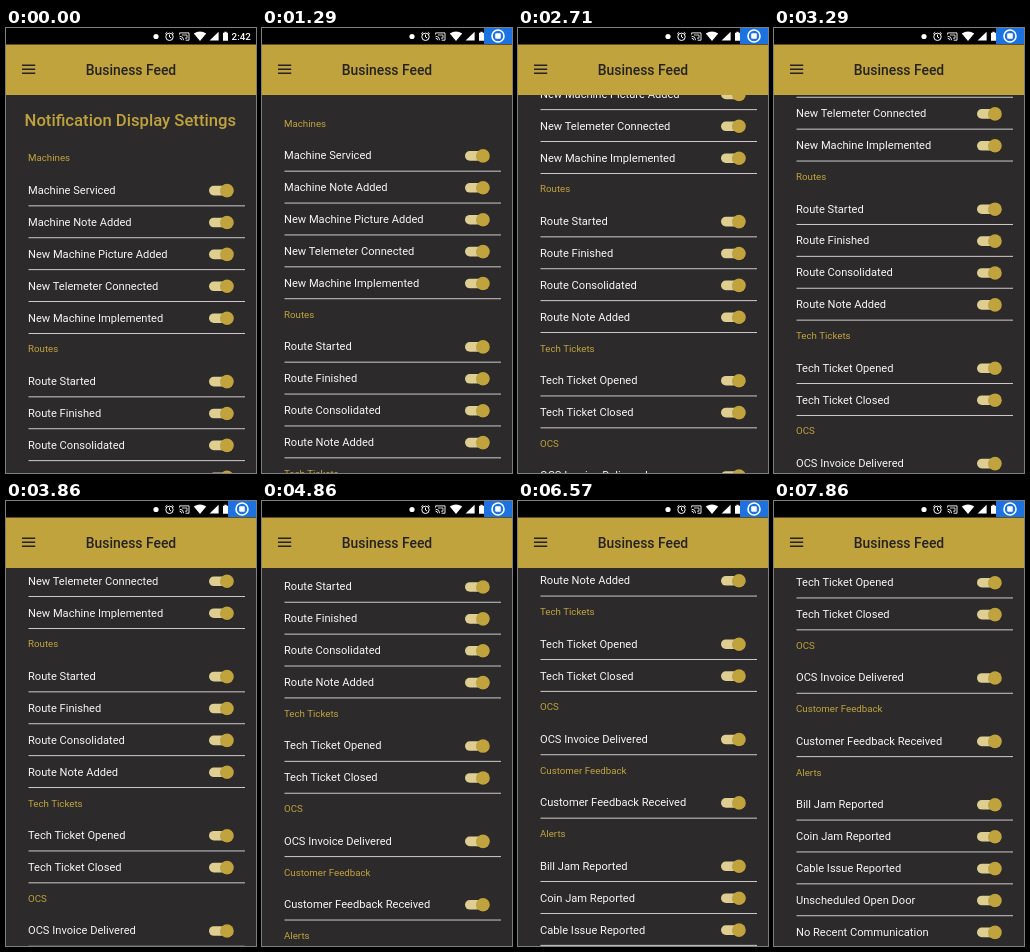
An HTML page for the animation above (8000 ms loop, 250x445 px).

```html
<!DOCTYPE html>
<html lang="en">
<head>
<meta charset="utf-8">
<title>Business Feed</title>
<style>
  html, body { margin: 0; width: 100%; height: 100%; overflow: hidden; background: #2c2a2b; }
  svg { display: block; width: 100%; height: 100%; font-family: Roboto, sans-serif; }
  .title { font-size: 16.67px; font-weight: 500; fill: #c1a33e; }
  .head { font-size: 9.72px; fill: #c1a33e; }
  .row { font-size: 11.11px; fill: #f6f6f6; }
  .bar { font-size: 13.89px; font-weight: 500; fill: #242223; }
  .clock { font-size: 9.8px; font-weight: 500; fill: #fff; }
</style>
</head>
<body>
<svg viewBox="0 0 250 445" preserveAspectRatio="none">
  <defs>
    <g id="toggle">
      <rect x="203" y="-4.8" width="24" height="9.6" rx="4.8" fill="#dfce92"/>
      <circle cx="221" cy=".5" r="7" fill="#000" opacity=".2"/>
      <circle cx="221" r="6.8" fill="#c1a33e"/>
    </g>
  </defs>
  <rect width="250" height="445" fill="#2c2a2b"/>
  <g id="list">
    <text class="title" x="124.3" y="98" text-anchor="middle">Notification Display Settings</text>
  </g>

  <rect y="16" width="250" height="51" fill="#c1a33e"/>
  <path d="M16 37.2h13.2M16 41.2h13.2M16 45.2h13.2" stroke="#242223" stroke-width="1.5"/>
  <text class="bar" x="125" y="46.8" text-anchor="middle">Business Feed</text>

  <rect width="250" height="16.5" fill="#000"/>
  <g fill="none" stroke="#fff">
    <circle cx="150" cy="8.5" r="2.6" fill="#fff" stroke="none"/>
    <circle cx="163.5" cy="8.8" r="3.7"/>
    <path d="M163.5 6.5v2.5l1.7 1M159.2 6l2-1.8M167.8 6l-2-1.8"/>
    <path d="M173.6 6.6v-1.7h9.4v7.3h-3.4M173.6 8.2a4 4 0 0 1 4 4M173.6 10.2a2 2 0 0 1 2 2" stroke-width=".9"/>
    <path d="M176 7h5v3.2h-2" stroke-width=".8"/>
    <path d="M194 13L187.8 5.6Q194 1.6 200.2 5.6z" fill="#fff" stroke="none"/>
    <path d="M203.6 12.6L212.6 3.8V12.6z" fill="#fff" stroke="none"/>
    <path d="M217 4.8h1.4v-1h2.2v1h1.4v7.9h-5z" fill="#fff" stroke="none"/>
  </g>
  <text class="clock" x="225.6" y="12.2">2:42</text>
  <g id="stop" opacity="0">
    <rect x="222" width="28" height="16" fill="#1c72e0"/>
    <circle cx="236" cy="8" r="6" fill="none" stroke="#fff" stroke-width="1.6"/>
    <rect x="233.2" y="5.2" width="5.6" height="5.6" rx="1" fill="#fff"/>
  </g>
</svg>
<script>
const SECTIONS = [
  ['Machines', 'Machine Serviced', 'Machine Note Added', 'New Machine Picture Added',
    'New Telemeter Connected', 'New Machine Implemented'],
  ['Routes', 'Route Started', 'Route Finished', 'Route Consolidated', 'Route Note Added'],
  ['Tech Tickets', 'Tech Ticket Opened', 'Tech Ticket Closed'],
  ['OCS', 'OCS Invoice Delivered'],
  ['Customer Feedback', 'Customer Feedback Received'],
  ['Alerts', 'Bill Jam Reported', 'Coin Jam Reported', 'Cable Issue Reported',
    'Unscheduled Open Door', 'No Recent Communication']
];
const LOOP = 8000, RATE = 7, ROW = 31.9, GAP = 31.5, DECAY = 0.2;

// [step, scroll offset]
const SCROLL = [[0, 0], [8, 0], [13, 121], [19, 160], [27, 178], [30, 180], [31, 180],
  [39, 335], [46, 369.5], [51, 380], [54, 380], [55, 431]];

const list = document.getElementById('list');
const stop = document.getElementById('stop');

function add(tag, attrs, text) {
  const el = document.createElementNS('http://www.w3.org/2000/svg', tag);
  for (const key in attrs) el.setAttribute(key, attrs[key]);
  if (text) el.textContent = text;
  list.append(el);
}

function buildList() {
  let y = 162;
  for (const [head, ...rows] of SECTIONS) {
    add('text', { class: 'head', x: 22, y: y - 28.6 }, head);
    for (const label of rows) {
      add('text', { class: 'row', x: 22, y: y + 4 }, label);
      add('use', { href: '#toggle', y: y + 0.6 });
      add('rect', { x: 22.5, y: y + 15.4, width: 216.5, height: 0.9, fill: '#dcdcdc' });
      y += ROW;
    }
    y += GAP;
  }
}

function scrollAt(step) {
  const i = SCROLL.findIndex(p => p[0] >= step);
  if (i === 0) return SCROLL[0][1];
  const [s0, y0] = SCROLL[i - 1], [s1, y1] = SCROLL[i];
  const fall = s => 1 - Math.exp(-DECAY * s);
  return y0 + (y1 - y0) * fall(step - s0) / fall(s1 - s0);
}

function draw(ms) {
  const step = Math.floor((ms % LOOP + 5) * RATE / 1000) % (LOOP * RATE / 1000);
  list.setAttribute('transform', `translate(0 ${-scrollAt(step).toFixed(2)})`);
  stop.setAttribute('opacity', Math.min(1, step / 3));
}

buildList();
const start = performance.now();
function tick() {
  draw(performance.now() - start);
  requestAnimationFrame(tick);
}
tick();
</script>
</body>
</html>
```
